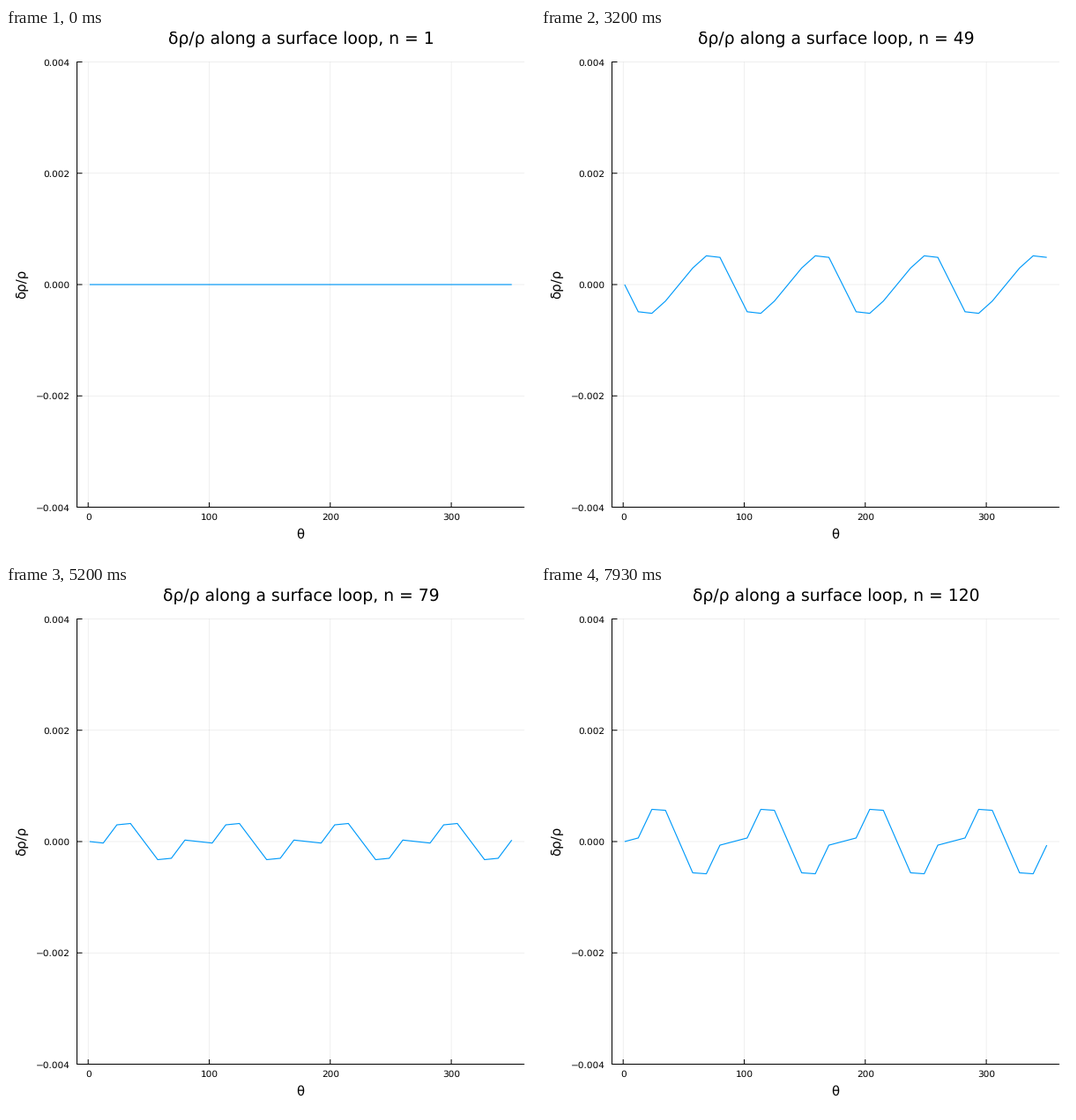
A matplotlib script for the animation above (8000 ms loop, 600 by 600 pixels).

```python
import numpy as np
import matplotlib.pyplot as plt
from matplotlib.animation import FuncAnimation

SIZE, LOOP_MS = 600, 8000
STEPS, HOLD = 120, 4          # counter values, animation frames per value
LEFT, RIGHT, TOP, BOTTOM = 80.5, 588, 38.5, 543.5
MID = (TOP + BOTTOM) / 2
POINTS = np.arange(32)
LINE_X = 94.86 + 15.445 * POINTS
MODES = np.array([np.sin(k * np.pi * POINTS / 4) for k in (1, 2, 3)])

plt.rcParams["font.family"] = "DejaVu Sans"
plt.rcParams["text.hinting"] = "none"

fig = plt.figure(figsize=(SIZE / 100, SIZE / 100), dpi=100, facecolor="white")
ax = fig.add_axes([0, 0, 1, 1])
ax.set_xlim(0, SIZE)
ax.set_ylim(SIZE, 0)
ax.axis("off")


def stroke(xs, ys, color="black", width=1.0, **kw):
    line, = ax.plot(xs, ys, color=color, lw=width * 0.72, snap=False,
                    solid_capstyle="butt", **kw)
    return line


def label(x, y, text, px, ha="center", **kw):
    return ax.text(x, y, text, fontsize=px * 0.72, ha=ha, va="baseline", **kw)


def wave_heights(n):
    """Pixel heights of three standing harmonics once the wave has arrived."""
    onset = 1 / (1 + np.exp((37.5 - n) / 2.3))
    main = -32.5 * np.cos(2 * np.pi * max(n - 49, 0) / 46.7)
    dip = -17 * np.exp(-((n - 66) / 11) ** 2)
    swing = n * np.cos(2 * np.pi * (n - 62.5) / 37)
    parts = np.array([main + dip, 0.1186 * swing - 2.26, 0.038 * swing])
    return onset * parts @ MODES


for k in range(4):
    x = 93.2 + 137.29 * k
    stroke([x, x], [TOP, BOTTOM], width=0.6, alpha=0.1)
    stroke([x, x], [BOTTOM, BOTTOM - 5.5])
    label(x, 558.2, str(100 * k), 10.5)

for k in range(-2, 3):
    y = MID - k * (BOTTOM - TOP) / 4
    stroke([LEFT, RIGHT], [y, y], width=0.6, alpha=0.1)
    stroke([LEFT, LEFT + 6], [y, y])
    label(72.5, y + 4, f"{k * 0.002:.3f}".replace("-", "−"), 10.5, ha="right")

stroke([LEFT, LEFT], [TOP - 0.5, BOTTOM + 0.5])
stroke([LEFT - 0.5, RIGHT], [BOTTOM, BOTTOM])
label(333.8, 579.3, "θ", 14.7)
label(21.8, MID - 0.5, "δρ/ρ", 15, rotation=90, rotation_mode="anchor")

title = label(334.5, 17.8, "", 18.8)
wave = stroke(LINE_X, np.full(len(POINTS), MID), color="#009AFA", width=1.15,
              solid_joinstyle="miter")


def draw(frame):
    n = min((frame + 1) // HOLD + 1, STEPS)
    title.set_text(f"δρ/ρ along a surface loop, n = {n}")
    wave.set_ydata(MID - wave_heights(n))
    return title, wave


FRAMES = STEPS * HOLD
anim = FuncAnimation(fig, draw, frames=FRAMES, interval=LOOP_MS / FRAMES,
                     repeat=True, repeat_delay=0, blit=False)
plt.show()
```
